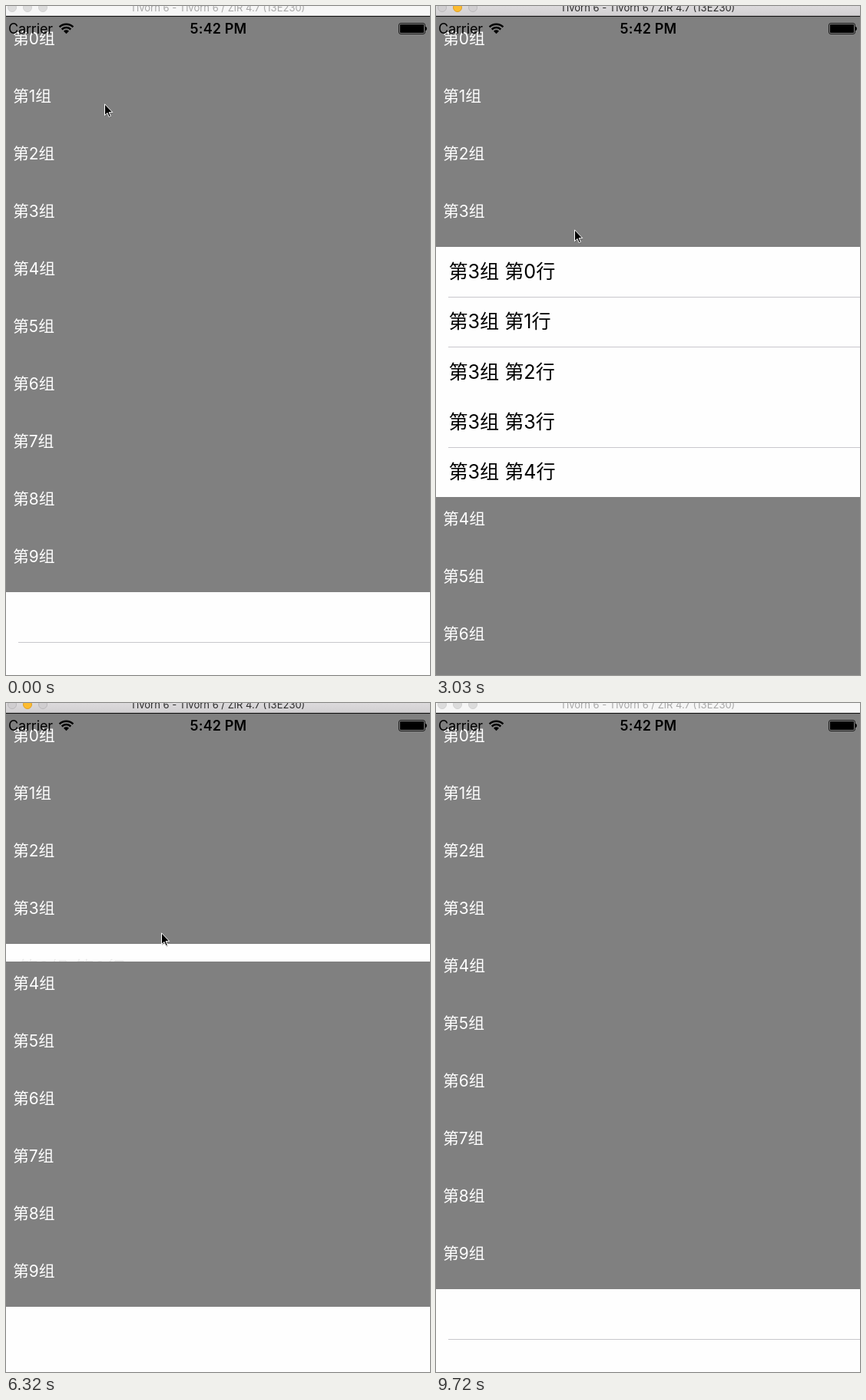
Animation of 552 by 872 pixels, one loop 9760 ms. Source, as an HTML page:

```html
<!DOCTYPE html>
<html lang="zh">
<head>
<meta charset="utf-8">
<title>Expanding groups</title>
<style>
  html, body { margin: 0; width: 100%; height: 100%; overflow: hidden; background: #fefefe; }
  svg { display: block; width: 552px; height: 872px; font-family: Inter, "Noto Sans CJK SC", "Noto Sans CJK", sans-serif; }
  .head rect { fill: #808080; }
  .head text { fill: #fff; font-size: 20.8px; }
  #rows text { font-size: 25.1px; }
  .line { fill: #c8c7cc; }
  .status { font-size: 18px; }
  #bar rect { fill: url(#active); }
  #bar circle { fill: #d0ced0; stroke: #bbb9bb; }
  #bar .mid { fill: #fdbc2f; stroke: #dda02a; }
  #bar text { font-size: 13px; fill: #2c2c2c; }
  #bar.idle rect { fill: #f6f6f6; }
  #bar.idle circle { fill: #dcdcdc; stroke: #d2d2d2; }
  #bar.idle text { fill: #a8a8a8; }
</style>
</head>
<body>
<svg viewBox="0 0 552 872">
  <defs>
    <linearGradient id="active" x2="0" y2="1">
      <stop stop-color="#dcdadc"/><stop offset="1" stop-color="#d1cfd1"/>
    </linearGradient>
  </defs>
  <g id="rows"></g>
  <g id="heads"></g>
  <rect id="blank" class="line" x="16" y="829" width="536" height="1"/>

  <g class="status">
    <text x="3" y="36" letter-spacing="-.15">Carrier</text>
    <g transform="translate(78.5 36.3)" fill="none" stroke="#000" stroke-width="2.5">
      <path d="M-8.9-8.9A12.6 12.6 0 0 1 8.9-8.9M-5.8-5.8A8.2 8.2 0 0 1 5.8-5.8"/>
      <path d="M0 0L-3.5-3.5A5 5 0 0 1 3.5-3.5Z" fill="#000" stroke="none"/>
    </g>
    <text x="276.5" y="36" text-anchor="middle" font-weight="600" letter-spacing=".15">5:42 PM</text>
    <rect x="511.5" y="22.5" width="34" height="14" rx="2.5" fill="none" stroke="#000" stroke-width=".8"/>
    <rect x="513" y="24" width="31" height="11" rx="1"/>
    <path d="M546.5 27Q548.5 29.5 546.5 32Z" stroke="#000"/>
  </g>

  <g id="bar">
    <rect width="552" height="13"/>
    <path d="M0 12h552v1H0z" opacity=".15"/>
    <circle cx="8" cy="2" r="5.5"/>
    <circle class="mid" cx="28" cy="2" r="5.5"/>
    <circle cx="48" cy="2" r="5.5"/>
    <text x="275.5" y="7" text-anchor="middle">Tivorn 6 - Tivorn 6 / ZiR 4.7 (13E230)</text>
  </g>
  <path d="M0 13h552v1H0z" fill="#111"/>

  <g id="cursor">
    <path d="M1 2V17L4.5 13.8L6.8 19L9 18L6.8 13H11.5Z" opacity=".25"/>
    <path d="M.5 .8V15.6L4 12.4L6.2 17.6L8.4 16.7L6.2 11.6H10.8Z" stroke="#fff"/>
  </g>
</svg>
<script>
const LOOP = 9760, FIRST = 195, TICK = 148.6; // the screen updates once per tick
const TOP = 14, HEAD = 75, ROW = 65.25, COUNT = 5, FADE = 1.75;
const AWAY = { x: 232, y: 890 };

// Each click opens a group; times are in ticks
const visits = [
  { group: 1, x: 128, y: 127, open: 0, close: 9 },
  { group: 3, x: 180, y: 291, open: 17, close: 24 },
  { group: 5, x: 160, y: 447, open: 31, close: 36 },
  { group: 3, x: 202, y: 299, open: 41, close: 45 },
  { group: 2, x: 219, y: 177, open: 51, close: 56 }
];

const $ = id => document.getElementById(id);
const ease = x => (1 - Math.cos(Math.PI * Math.max(0, Math.min(1, x)))) / 2;
const move = (el, x, y) => el.setAttribute("transform", `translate(${Math.round(x)} ${Math.round(y)})`);
const repeat = (n, make) => Array.from({ length: n }, (_, i) => make(i)).join("");

$("heads").innerHTML = repeat(10, i =>
  `<g class="head"><rect width="552" height="${HEAD}"/><text x="9" y="36">第${i}组</text></g>`);
$("rows").innerHTML = repeat(COUNT, i => `<text x="16.5" y="${41 + i * ROW}"></text>`) +
  repeat(COUNT - 1, i => i === 2 ? "" :
    `<rect class="line" x="16" y="${Math.floor((i + 1) * ROW)}" width="536" height="1"/>`);

const heads = [...$("heads").children];
const labels = [...$("rows").querySelectorAll("text")];

function draw(time) {
  const n = Math.floor((time % LOOP - FIRST) / TICK);
  const at = Math.max(0, visits.findLastIndex(v => v.open <= n));
  const { group, x, y, open, close } = visits[at];
  const next = visits[at + 1] || AWAY;
  const shown = ease((n - open + .3) / FADE) - ease((n - close) / FADE);
  const gone = ease((n - close - 1) / 3);

  heads.forEach((h, i) => move(h, 0, TOP + HEAD * i + (i > group ? COUNT * ROW * shown : 0)));
  labels.forEach((l, i) => l.textContent = `第${group}组 第${i}行`);
  move($("rows"), 0, TOP + HEAD * (group + 1));
  $("rows").setAttribute("opacity", shown);
  $("blank").setAttribute("opacity", n >= open && n < close ? 0 : 1);
  $("bar").setAttribute("class", n < 0 || n > 63 ? "idle" : "");
  move($("cursor"), x + (next.x - x) * gone, y + (next.y - y) * gone);
}

const begin = performance.now();
function tick() {
  draw(performance.now() - begin);
  requestAnimationFrame(tick);
}
tick();
</script>
</body>
</html>
```
